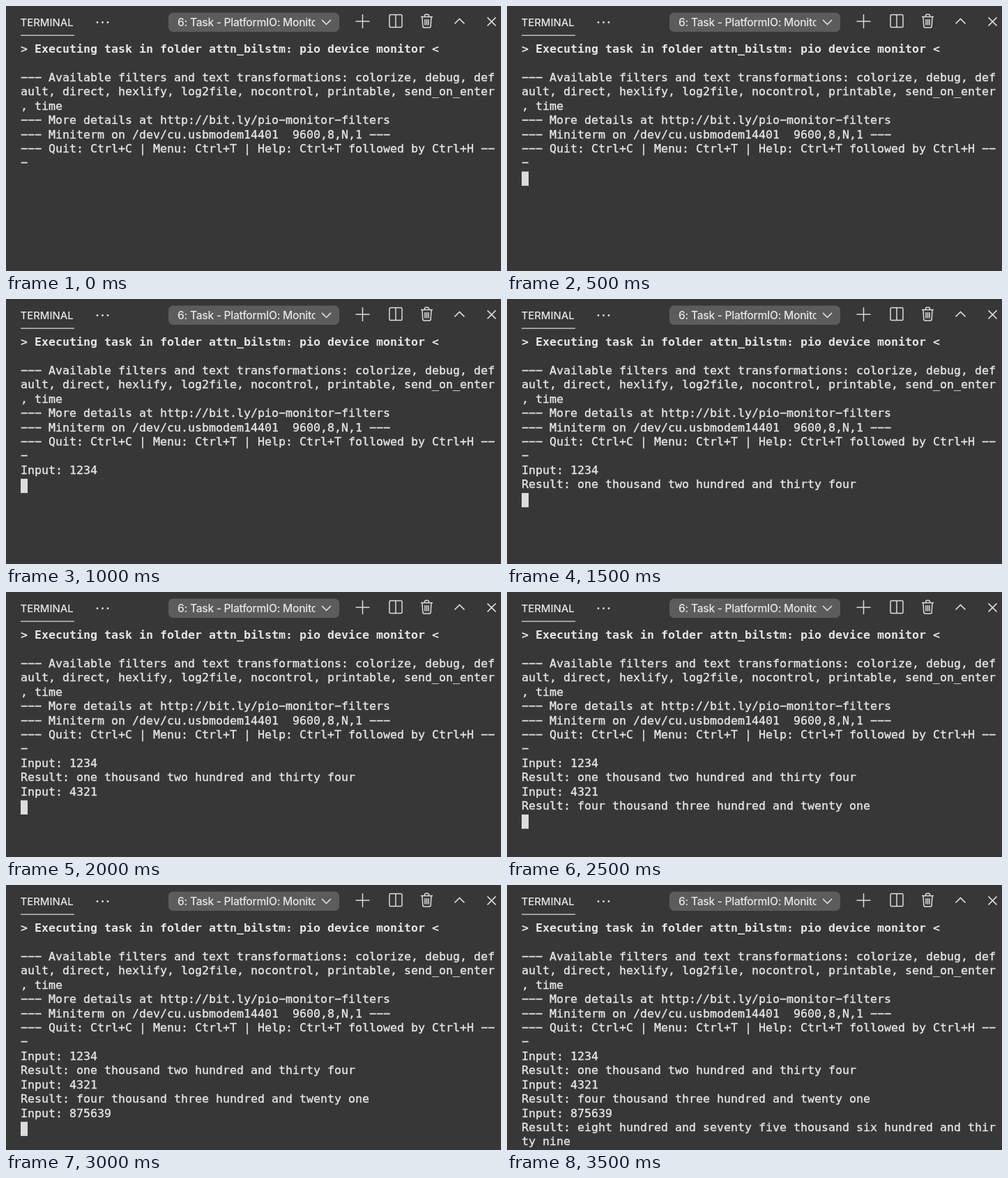
Write an HTML page that moves like this. It is 710 px wide and 380 px high and loops after 4000 ms.

```html
<!DOCTYPE html>
<html lang="en">
<head>
<meta charset="utf-8">
<title>Terminal</title>
<style>
  html, body { margin: 0; width: 100%; height: 100%; overflow: hidden; background: #373737; }
  svg { display: block; width: 710px; height: 380px; }
  text { fill: #e6e6e6; white-space: pre; }
  .ui { font-family: Inter, sans-serif; font-weight: 500; }
  .mono { font: 16.61px "DejaVu Sans Mono", monospace; stroke: #e6e6e6; stroke-width: 0.35; }
  .bold { font-weight: bold; stroke: none; }
  .icons { fill: none; stroke: #dcdcdc; stroke-width: 1.5; }
</style>
</head>
<body>
<svg viewBox="0 0 710 380">
  <defs><clipPath id="label"><rect x="240" y="9" width="203.5" height="28"/></clipPath></defs>
  <rect width="710" height="380" fill="#373737"/>
  <text class="ui" x="20.5" y="29" font-size="14.9">TERMINAL</text>
  <rect x="21" y="41.500" width="77" height="1.2" fill="#e0e0e0"/>
  <g fill="#dcdcdc">
    <circle cx="131" cy="23.5" r="1.4"/><circle cx="138.5" cy="23.5" r="1.4"/><circle cx="146" cy="23.5" r="1.4"/>
  </g>
  <rect x="233" y="9.500" width="245" height="27.5" rx="6.5" fill="#5c5c5c"/>
  <text class="ui" x="246" y="29" font-size="15.6" letter-spacing="-0.27" clip-path="url(#label)">6: Task - PlatformIO: Monitor</text>
  <g class="icons" transform="translate(0 -0.6)">
    <path d="M453 20.5l6.5 6.5 6.5-6.5"/>
    <path d="M511.5 12.5v20M501.5 22.5h20"/>
    <rect x="550" y="13" width="18" height="18" rx="1.5"/>
    <path d="M559 13v18"/>
    <path d="M595 16h17M600.5 16v-1.500q0-2 2-2h2q2 0 2 2v1.500M597 16l.8 13.500q.1 2 2 2h7.400q1.900 0 2-2l.8-13.500M601 19.500v8.500M603.500 19.500v8.500M606 19.500v8.500"/>
    <path d="M643.500 26l7-7 7 7"/>
    <path d="M690.500 17l12 12M702.500 17l-12 12"/>
  </g>
  <g id="lines"></g>
  <rect id="cursor" x="21" width="10" height="20.4" fill="#dcdcdc"/>
</svg>
<script>
const LEFT = 21, TOP = 53.5, PITCH = 20.43, STEP = 500, LOOP = 4000, FIRST = 9;
const banner = [
  "> Executing task in folder attn_bilstm: pio device monitor <",
  "",
  "--- Available filters and text transformations: colorize, debug, def",
  "ault, direct, hexlify, log2file, nocontrol, printable, send_on_enter",
  ", time",
  "--- More details at http://bit.ly/pio-monitor-filters",
  "--- Miniterm on /dev/cu.usbmodem14401  9600,8,N,1 ---",
  "--- Quit: Ctrl+C | Menu: Ctrl+T | Help: Ctrl+T followed by Ctrl+H --",
  "-"
];
const session = [
  "Input: 1234",
  "Result: one thousand two hundred and thirty four",
  "Input: 4321",
  "Result: four thousand three hundred and twenty one",
  "Input: 875639",
  "Result: eight hundred and seventy five thousand six hundred and thir",
  "ty nine"
];
const lines = document.getElementById("lines");
const cursor = document.getElementById("cursor");

function addLine(str, row) {
  const el = document.createElementNS("http://www.w3.org/2000/svg", "text");
  el.setAttribute("class", row ? "mono" : "mono bold");
  el.setAttribute("x", LEFT);
  el.setAttribute("y", Math.round(TOP + row * PITCH + 13.5));
  // the minus sign gives the wide dash of the terminal face
  el.textContent = str.replace(/-/g, "\u2212");
  lines.appendChild(el);
  return el;
}

banner.forEach(addLine);
const output = session.map((str, i) => addLine(str, FIRST + i));

function draw(ms) {
  const step = Math.floor((ms % LOOP) / STEP);
  // the last result wraps, so its two rows appear together
  const shown = step === 7 ? output.length : Math.max(0, step - 1);
  output.forEach((el, i) => el.setAttribute("visibility", i < shown ? "visible" : "hidden"));
  cursor.setAttribute("visibility", step ? "visible" : "hidden");
  cursor.setAttribute("y", TOP + (FIRST + shown) * PITCH);
}

const start = performance.now();
function tick() {
  draw(performance.now() - start);
  requestAnimationFrame(tick);
}
draw(0);
requestAnimationFrame(tick);
</script>
</body>
</html>
```
